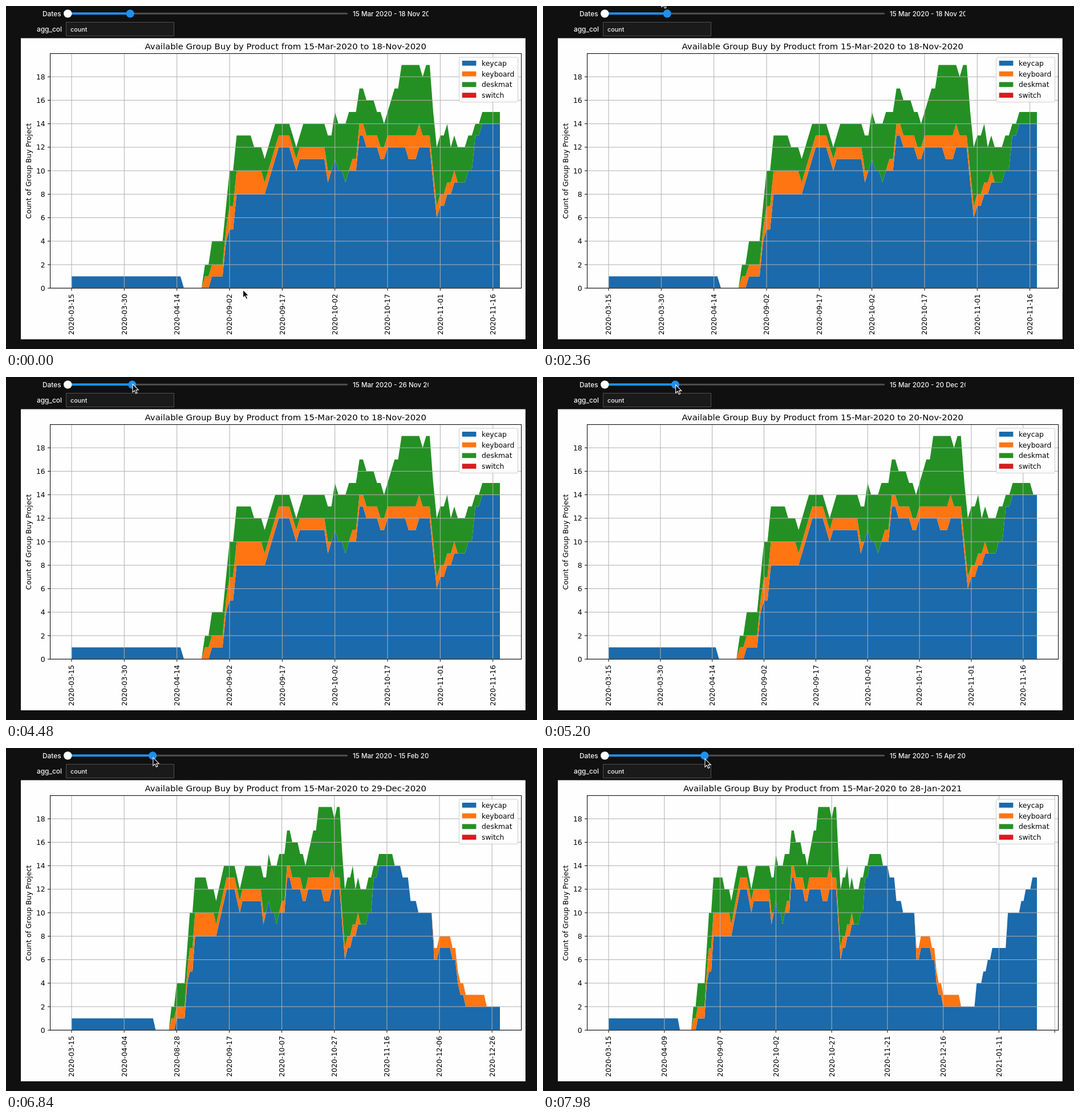
An HTML page for the animation above (8 s loop, 931 by 602 pixels).

```html
<!DOCTYPE html>
<html lang="en">
<head>
<meta charset="utf-8">
<title>Group buy chart</title>
<style>
  html, body { margin: 0; width: 100%; height: 100%; overflow: hidden; background: #101010; }
  svg { display: block; width: 931px; height: 602px; }
  .ui { font: 500 11.6px Inter, sans-serif; fill: #f4f4f4; }
  .label { font-size: 11.9px; }
  .value { font-size: 10.8px; }
  .plot { font: 12.36px "DejaVu Sans", sans-serif; fill: #000; }
  .title { font-size: 14.86px; }
  .grid { stroke: #b0b0b0; fill: none; }
  .axis { stroke: #000; fill: none; }
</style>
</head>
<body>
<svg id="stage" viewBox="0 0 931 602"></svg>
<script>
const LOOP = 8000, DAY = 864e5, START = Date.UTC(2020, 2, 15);
const AXES = { left: 77.5, right: 903.5, top: 83.5, bottom: 495.2 };
const FIRST_X = 115, LAST_X = 866, UNIT = 20.61;
const COLORS = { keycap: '#1b6aab', keyboard: '#ff7512', deskmat: '#249024', switch: '#d71c20' };
const ACCENT = '#2090ee';

// Number of projects open on a row, each given as [first row, last row].
const openProjects = spans => row => spans.filter(([from, to]) => from <= row && row <= to).length;

// Whole counts along a line through a few [row, level] points.
const trend = points => row => {
  const i = points.findIndex(p => p[0] >= row);
  if (i < 1) return Math.round(points.at(i)[1]);
  const [[x0, y0], [x1, y1]] = points.slice(i - 1, i + 1);
  return Math.round(y0 + (y1 - y0) * (row - x0) / (x1 - x0));
};

const SERIES = {
  keycap: trend([[31,1], [32,0], [39,.4], [43,1.4], [44,4], [46,5], [47,8], [55,8], [59,12], [62,12],
    [64,10], [65,11], [72,11], [73,9], [75,11], [78,9.3], [81,10.2], [82,12.9], [89,11], [90,12],
    [95,12], [96,11], [99,11.6], [102,12], [104,6.4], [109,8.6], [114,10], [115,12.8], [117,14],
    [125,13.6], [128,12.6], [129,10.9], [137,9.6], [138,6], [142,7.4], [146,5.6], [147,4], [150,2],
    [164,2], [165,3.5], [172,6.6], [178,7], [179,10], [184,10.4], [191,13]]),
  keyboard: openProjects([[38,73], [45,54], [80,109], [96,99], [138,157]]),
  deskmat: openProjects([[38,51], [40,58], [45,79], [66,81], [73,86], [75,88], [78,98], [88,102],
    [91,107], [92,107], [94,114], [94,114], [101,122]])
};

const svg = document.getElementById('stage');
function add(parent, tag, attrs, text) {
  const el = document.createElementNS('http://www.w3.org/2000/svg', tag);
  for (const key in attrs) el.setAttribute(key, attrs[key]);
  if (text !== undefined) el.textContent = text;
  return parent.appendChild(el);
}
const box = (parent, x, y, width, height, attrs) => add(parent, 'rect', { x, y, width, height, ...attrs });

// The rows skip the summer gap and one day around new year.
const rowToDay = row => row < 35 ? row : row < 164 ? row + 126 : row + 127;
const dayToRow = day => day < 291 ? day - 126 : day - 127;
const iso = day => new Date(START + day * DAY).toISOString().slice(0, 10);
function named(day, sep) {
  const d = new Date(START + day * DAY);
  const month = 'JanFebMarAprMayJunJulAugSepOctNovDec'.substr(d.getUTCMonth() * 3, 3);
  return [String(d.getUTCDate()).padStart(2, '0'), month, d.getUTCFullYear()].join(sep);
}

// The slider end is dragged at a steady pace that quickens at the end.
const DRAG_START = 4250;
const dragTime = t => Math.max(0, t - DRAG_START) / 1000;
const dayAt = t => Math.round(248 + 33.6 * dragTime(t) + .00226 * dragTime(t) ** 7);
const sliderX = t => 108 + dayAt(t) * .4425;

// Each redraw shows the day the slider had when the redraw before it was done.
const REDRAWS = [4310, 4726, 5470, 6350, 7200];
const redrawsDone = t => REDRAWS.filter((done, i) => i > 0 && done <= t).length;

function drawChart(day) {
  const last = dayToRow(day);
  const step = [15, 20, 25].find(s => last / s < 9);
  const g = add(svg, 'g', { class: 'plot' });
  const { left, right, top, bottom } = AXES;
  const px = row => FIRST_X + row * (LAST_X - FIRST_X) / last;
  const py = value => bottom - value * UNIT;
  box(g, 26, 56.5, 884.8, 528.5, { fill: '#fefefe' });

  const rows = Array.from({ length: last + 1 }, (_, i) => i);
  let base = rows.map(() => 0);
  for (const name in SERIES) {
    const tops = rows.map(r => base[r] + SERIES[name](r));
    const edge = values => rows.map(r => px(r).toFixed(2) + ',' + py(values[r]).toFixed(2));
    add(g, 'polygon', { points: [...edge(tops), ...edge(base).reverse()].join(' '), fill: COLORS[name] });
    base = tops;
  }

  for (let row = 0; px(row) < right; row += step) {
    const x = px(row);
    add(g, 'path', { class: 'grid', d: `M${x} ${top}V${bottom}` });
    add(g, 'path', { class: 'axis', d: `M${x} ${bottom}v4.5` });
    if (row <= last) add(g, 'text', { transform: `translate(${x + 4.4} 505.4) rotate(-90)`, 'text-anchor': 'end' },
      iso(rowToDay(row)));
  }
  for (let value = 0; value <= 18; value += 2) {
    const y = py(value);
    add(g, 'path', { class: 'grid', d: `M${left} ${y}H${right}` });
    add(g, 'path', { class: 'axis', d: `M${left} ${y}h-4.5` });
    add(g, 'text', { x: 68.7, y: y + 4.6, 'text-anchor': 'end' }, value);
  }
  box(g, left, top, right - left, bottom - top, { class: 'axis' });

  add(g, 'text', { class: 'title', x: 490.3, y: 76.2, 'text-anchor': 'middle' },
    `Available Group Buy by Product from ${named(0, '-')} to ${named(day, '-')}`);
  add(g, 'text', { transform: 'translate(44.3 289.5) rotate(-90)', 'text-anchor': 'middle' },
    'Count of Group Buy Project');

  box(g, 794.5, 90, 103, 78.5, { rx: 2.5, fill: '#fff', 'fill-opacity': .8, stroke: '#ccc' });
  Object.keys(COLORS).forEach((name, i) => {
    const y = 96 + i * 18.75;
    box(g, 799.7, y, 24.7, 8.7, { fill: COLORS[name] });
    add(g, 'text', { x: 834, y: y + 8.8 }, name);
  });
  return g;
}

const charts = [0, ...REDRAWS.slice(0, -1)].map(t => drawChart(dayAt(t)));

const ui = add(svg, 'g', { class: 'ui' });
add(ui, 'text', { class: 'label', x: 64, y: 17.8 }, 'Dates');
add(ui, 'text', { class: 'label', x: 98, y: 44.8, 'text-anchor': 'end' }, 'agg_col');
box(ui, 105.5, 28.5, 189, 24, { fill: '#1a1a1a', stroke: '#505050' });
add(ui, 'text', { class: 'value', x: 113, y: 44.6 }, 'count');
box(ui, 108, 11.7, 491, 3.1, { rx: 1.5, fill: '#505050' });
const fill = box(ui, 108, 11.2, 110, 4, { fill: ACCENT });
add(ui, 'circle', { cx: 108.3, cy: 13.4, r: 7.2, fill: '#fff' });
const handle = add(ui, 'circle', { cy: 13.4, r: 7.1, fill: ACCENT });
const clip = add(svg, 'clipPath', { id: 'readout' });
box(clip, 600, 0, 140.8, 28);
const readout = add(add(ui, 'g', { 'clip-path': 'url(#readout)' }), 'text', { x: 608, y: 17.8 });

const pointer = add(svg, 'path', {
  d: 'M0 0V14.2L3.3 11.2L5.6 16.4L8 15.4L5.8 10.3H10.2Z',
  fill: '#000', stroke: '#fff', 'stroke-width': 1.1
});

function smooth(t, from, to) {
  const k = Math.min(1, Math.max(0, (t - from) / (to - from)));
  return k * k * (3 - 2 * k);
}

// The pointer leaves over the top edge, returns to the handle and drags it.
function pointerAt(t) {
  const leave = smooth(t, 250, 1150), back = smooth(t, 2700, 3240);
  const drag = sliderX(t) - sliderX(0);
  return [415.5 - 207.5 * leave + 10.5 * back + drag, 498 - 510.5 * leave + 24.5 * back + 1.9 * dragTime(t)];
}

let origin;
function frame(now) {
  origin ??= now;
  const t = (now - origin) % LOOP;
  const current = redrawsDone(t);
  charts.forEach((g, i) => g.style.display = i === current ? '' : 'none');

  handle.setAttribute('cx', sliderX(t));
  fill.setAttribute('width', sliderX(t) - 108);
  readout.textContent = `${named(0, ' ')} - ${named(dayAt(t), ' ')}`;
  pointer.setAttribute('transform', `translate(${pointerAt(t)})`);
  requestAnimationFrame(frame);
}
requestAnimationFrame(frame);
</script>
</body>
</html>
```
